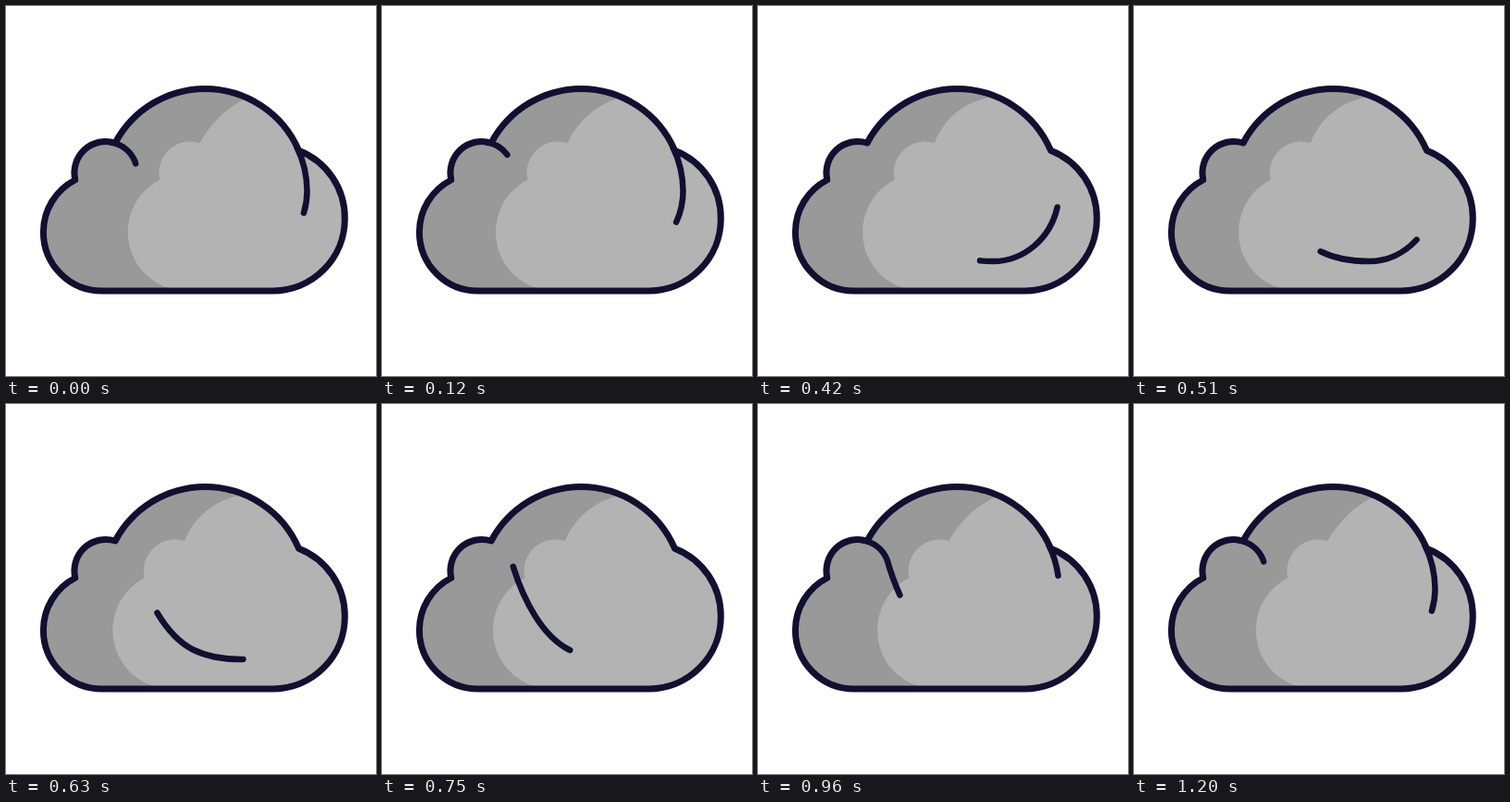
Animation, 400 px wide and 400 px high, one loop 1230 ms. Source, as an HTML page:

```html
<!DOCTYPE html>
<html lang="en">
<head>
<meta charset="utf-8">
<title>Cloud</title>
<style>
  html, body {
    margin: 0;
    width: 100%;
    height: 100%;
    overflow: hidden;
    background: #fff;
  }
  svg {
    display: block;
    width: 100%;
    height: 100%;
  }
  :root {
    --narrow: path("M195.5 308 A63.5 63.5 0 0 1 166.3 188 A33.9 33.9 0 0 1 209.6 148 C222 126 241.7 107 265 97.6 H400 V308 Z");
    --wide: path("M176.8 308 A63.5 63.5 0 0 1 147.6 188 A33.9 33.9 0 0 1 190.9 148 C202 117.5 232 96.8 265 98 H400 V308 Z");
  }
  .shade { fill: #999; }
  .light {
    fill: #b3b3b3;
    d: var(--narrow);
    animation: spread 1230ms infinite;
  }
  .line {
    fill: none;
    stroke: #111030;
    stroke-width: 7;
    stroke-linecap: round;
    stroke-linejoin: round;
  }
  .curl {
    stroke-width: 6.5;
    stroke-dasharray: 30 70;
    animation: run 1230ms infinite;
  }
  /* Both motions rest briefly before the loop restarts. */
  @keyframes spread {
    0% {
      d: var(--narrow);
      animation-timing-function: cubic-bezier(.167, .167, .667, 1);
    }
    26.83% { d: var(--wide); }
    40.65% {
      d: var(--wide);
      animation-timing-function: cubic-bezier(.333, 0, .667, 1);
    }
    90.24%, 100% { d: var(--narrow); }
  }
  @keyframes run {
    0% {
      stroke-dashoffset: -89.7;
      animation-timing-function: cubic-bezier(.333, 0, .667, 1);
    }
    97.56%, 100% { stroke-dashoffset: -189.7; }
  }
</style>
</head>
<body>
<svg viewBox="0 0 400 400">
  <defs>
    <path id="cloud" d="M104 308
      A63.5 63.5 0 0 1 40.4 244.5
      A63.5 63.5 0 0 1 74.8 188
      A33.9 33.9 0 0 1 118.1 148
      A110.5 110.5 0 0 1 215 89.4
      A110.5 110.5 0 0 1 316.5 156.2
      A78.2 78.2 0 0 1 366.3 230
      A78 78 0 0 1 288.5 308 Z"/>
    <clipPath id="inside"><use href="#cloud"/></clipPath>
  </defs>
  <use class="shade" href="#cloud"/>
  <g clip-path="url(#inside)">
    <path class="light"/>
  </g>
  <use class="line" href="#cloud"/>
  <path class="line curl" pathLength="100" d="M314.3 152.2
    A110.5 110.5 0 0 1 325.5 200
    A71.5 76 0 0 1 254 276
    C236 276 217 273 202 265.5
    C172 250 151 209 139.6 168.5
    A33.7 33.7 0 0 0 112 147.2"/>
</svg>
</body>
</html>
```
